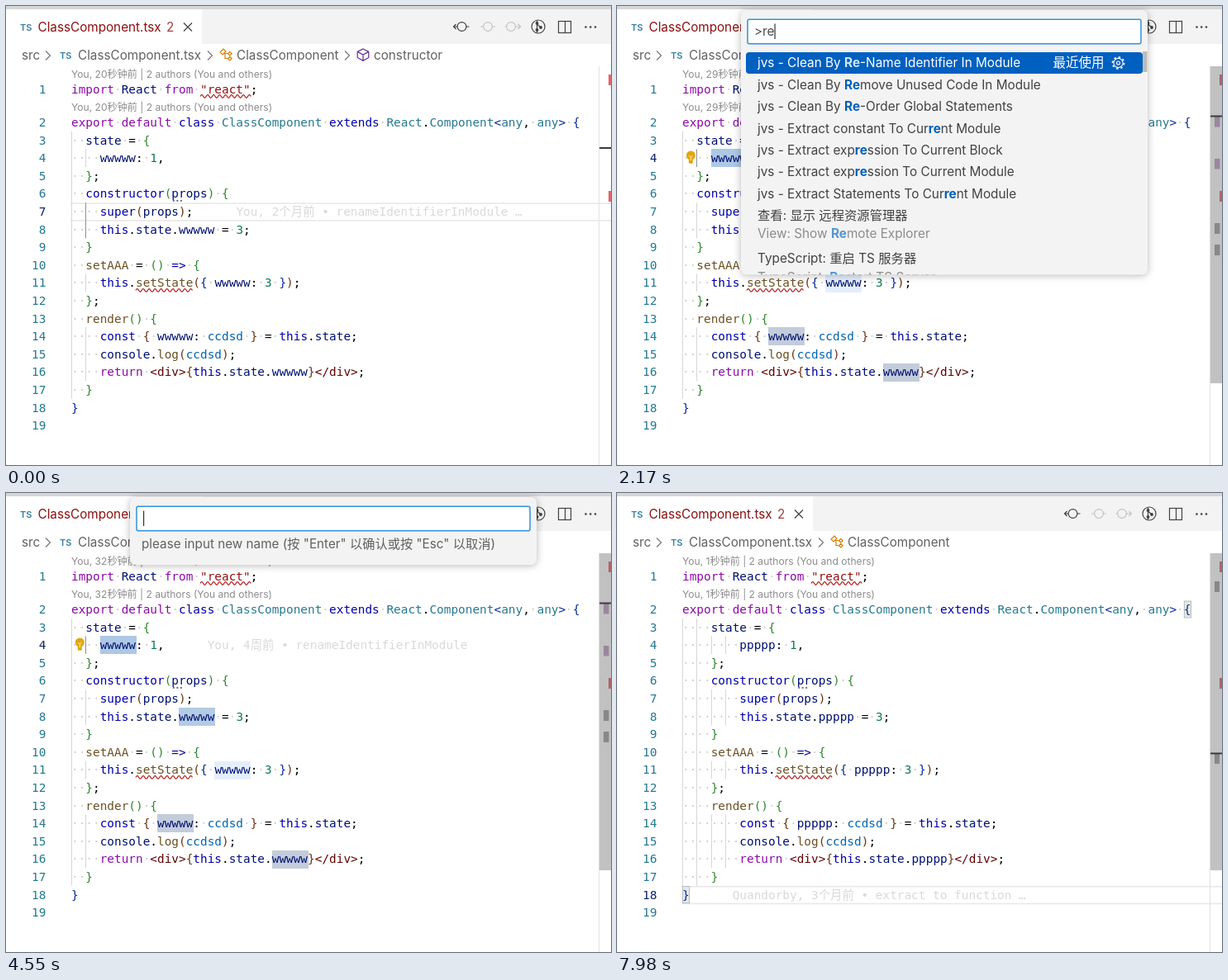
These frames come from a looping animation (732x556 px, 8 s). An HTML page:

```html
<!DOCTYPE html>
<html lang="zh-CN">
<head>
<meta charset="utf-8">
<title>Rename identifier</title>
<style>
  html, body { margin: 0; width: 100%; height: 100%; overflow: hidden; background: #fff; }
  svg { display: block; }
  text { white-space: pre; }
  .ui { font: 15.25px Inter, "Noto Sans CJK SC", sans-serif; fill: #616161; }
  .mono { font: 14.4px "DejaVu Sans Mono", "Noto Sans CJK SC", monospace; }
  .lens { font-size: 12.1px; fill: #8c8c8c; }
  .ts { font-size: 11px; font-weight: 600; fill: #3a7f9f; }
  .err { fill: #8a0f0f; }
  .blame { fill: #d9d9d9; }
  .dots { fill: #cfcfcf; }
  .num { fill: #237893; text-anchor: end; }
  .now { fill: #0b216f; }
  .line { fill: none; stroke: #424242; stroke-width: 1.2; }
  .pale { stroke: #c3c3c3; }
  .item { font-size: 15.33px; fill: #424242; }
  .typed { fill: #4a4a4a; }
  .bold { font-weight: 700; fill: #0060b8; }
  .sub { fill: #8c8c8c; }
  .sub .bold { fill: #5596cf; }
  .on { fill: #fff; }
  .on .bold { fill: #cbe8ff; }
  .cjk { font-size: 15.5px; }
  .link { fill: #0060b8; }
  .key { font-size: 13px; fill: #555; }
  .panel { fill: #f3f3f3; filter: drop-shadow(0 1px 5px rgba(0,0,0,.28)); }
</style>
</head>
<body>
<svg id="stage" width="732" height="556" viewBox="0 0 732 556"></svg>
<script>
const LOOP = 8000, LEFT = 79, CW = 8.669, LH = 21.6;
const stage = document.getElementById('stage');
const pen = document.createElement('canvas').getContext('2d');

const COLORS = {
  k: '#8c0aa5', b: '#0000a8', v: '#001070', y: '#267a90', f: '#6b5022', s: '#8f1212',
  n: '#0a7a50', c: '#0064b0', g: '#600000', t: '#000', 1: '#0a2a9c', 2: '#2f882f', 3: '#6a3414'
};
// Each line: indent level, then tokens led by a colour key; @ is the renamed identifier.
const CODE = [
  '0kimport| |vReact| |kfrom| |s"react"|t;',
  '0kexport default| |bclass| |yClassComponent| |bextends| |yReact|t.|yComponent|1<|yany|t,| |yany|1>| |1{',
  '1vstate| |t=| |2{',
  '2v@|t:| |n1|t,',
  '12}|t;',
  '1bconstructor|2(|vprops|2)| |2{',
  '2bsuper|3(|vprops|3)|t;',
  '2bthis|t.|vstate|t.|v@| |t=| |n3|t;',
  '12}',
  '1fsetAAA| |t=| |2()| |b=>| |2{',
  '2bthis|t.|fsetState|3(|1{| |v@|t:| |n3| |1}|3)|t;',
  '12}|t;',
  '1frender|2()| |2{',
  '2bconst| |3{| |v@|t:| |cccdsd| |3}| |t=| |bthis|t.|vstate|t;',
  '2vconsole|t.|flog|3(|cccdsd|3)|t;',
  '2kreturn| |g<div>|3{|bthis|t.|vstate|t.|v@|3}|g</div>|t;',
  '12}',
  '01}',
  '0'
];
const LONG_LIST = [
  'jvs - Clean By [Re-Name] Identifier In Module',
  'jvs - Clean By [Re]move Unused Code In Module',
  'jvs - Clean By [Re]-Order Global Statements',
  'jvs - Extract constant To Cur[re]nt Module',
  'jvs - Extract exp[re]ssion To Current Block',
  'jvs - Extract exp[re]ssion To Current Module',
  'jvs - Extract Statements To Cur[re]nt Module'
];
const QUERY = [[1610, ''], [1960, 'r'], [2100, 're'], [2240, 'ren'], [2310, 'rena'], [2450, 'renam'], [2590, 'rename']];
const NAME = [[3500, ''], [5320, 'p'], [5460, 'pp'], [5740, 'ppp'], [5880, 'pppp'], [6160, 'ppppp']];

const esc = s => s.replace(/&/g, '&amp;').replace(/</g, '&lt;');
const at = (steps, t) => steps.filter(s => s[0] <= t).pop()[1];
const colX = c => LEFT + c * CW;
const midY = n => n === 1 ? 101.4 : 141 + (n - 2) * LH;
const text = (x, y, s, cls = 'ui', extra = '') => `<text x="${x}" y="${y}" class="${cls}" ${extra}>${s}</text>`;
const rect = (x, y, w, h, fill, extra = '') => `<rect x="${x}" y="${y}" width="${w}" height="${h}" fill="${fill}" ${extra}/>`;
const path = (d, extra = '') => `<path d="${d}" class="line" ${extra}/>`;
const icon = (x, y, d, style = '') => `<g transform="translate(${x} ${y})">${path(d, `style="${style}"`)}</g>`;
const cursor = (c, n) => rect(Math.round(colX(c)), Math.round(midY(n) - LH / 2), 2, 22, '#000');

function squiggle(x, y, w) {
  return path(`M${x} ${y}q1.8 -3.6 3.6 0` + 't3.6 0'.repeat(Math.round(w / 3.6) - 1), 'style="stroke:#b01818"');
}

const wrench = x => icon(x, 51, 'M10 2a4 4 0 0 1 3 .3L10.3 5l.8 1.8 1.8.8 2.6-2.6a4.2 4.2 0 0 1-5.8 4.9L4.2 15.3a1.9 1.9 0 0 1-2.7-2.7L7 7.2A4.2 4.2 0 0 1 10 2z');
const cube = x => icon(x, 51, 'M8 1L14.8 4.4V11.4L8 15.2 1.2 11.4V4.4ZM1.2 4.4L8 8 14.8 4.4M8 8V15.2', 'stroke:#652d90');
const chevron = x => path(`M${x - 3} 54.5l5.5 5.5-5.5 5.5`, 'style="stroke:#777"');

function header(t) {
  let s = rect(0, 0, 732, 4, '#d6d6d6') + rect(0, 4, 237, 42, '#fff') + rect(237, 4, 495, 42, '#f3f3f3');
  s += text(17, 29.5, 'TS', 'ui ts') + text(38.5, 31, 'ClassComponent.tsx', 'ui err') + text(194, 31, '2', 'ui err', 'opacity=".8"');
  s += path('M215 20.5l10 10m0-10l-10 10');
  s += path('M560.5 25H557M546 25H541.5m3-3l-3 3 3 3') + '<circle cx="551.5" cy="25" r="5.4" class="line"/>';
  s += '<g class="line pale"><circle cx="583" cy="25" r="5.4"/><circle cx="611" cy="25" r="5.4"/>'
    + '<path d="M574 25h3.5m11 0h3.5M603.5 25h2m11 0h6m-3-3l3 3-3 3"/></g>';
  s += '<g class="line"><circle cx="644" cy="25" r="8"/><path d="M642.5 17.5v15M642.5 22l4.5 4"/>'
    + '<rect x="668.5" y="18.5" width="15" height="14"/><path d="M676.5 18.5v14"/></g>';
  for (const [x, y] of [[642.5, 21], [647, 26], [642.5, 29], [701.5, 25.5], [707.2, 25.5], [713, 25.5]])
    s += `<circle cx="${x}" cy="${y}" r="${x < 700 ? 1.9 : 1.3}" fill="#424242"/>`;

  s += text(19, 65, 'src') + chevron(51) + text(65, 63.5, 'TS', 'ui ts') + text(87, 65, 'ClassComponent.tsx') + chevron(247);
  s += icon(258, 51, 'M5 1L8 4 4 8 1 5ZM6 6.5H11M7 6.5V12.5H10.5M12.8 4.4l2.4 2.3-2.4 2.3-2.3-2.3zM12.8 10.4l2.4 2.3-2.4 2.3-2.3-2.3z', 'stroke:#d67e00');
  s += text(279, 65, 'ClassComponent');
  if (t < 770) s += chevron(413) + cube(424) + text(445, 65, 'constructor');
  else if (t < 7420) s += chevron(413) + wrench(424) + text(445, 65, 'state') + chevron(491) + wrench(502.5) + text(523.5, 65, 'wwwww');
  return s;
}

function codeLine(raw, n, unit, name) {
  const y = midY(n) + 5;
  let col = raw[0] * unit, plain = ' '.repeat(col), spans = '';
  for (const token of raw.slice(1).split('|')) {
    const word = token === ' ' ? ' ' : token.slice(1).replace('@', name);
    if (word.trim()) spans += `<tspan x="${colX(col)}" fill="${COLORS[token[0]]}">${esc(word)}</tspan>`;
    col += word.length;
    plain += word;
  }
  const dots = plain.replace(/[^ ]/g, '\u00a0').replace(/ /g, '·');
  return text(LEFT, y, dots, 'mono dots') + text(LEFT, y, spans, 'mono');
}

function guides(unit, active) {
  let s = '';
  for (let n = 3; n <= 17; n++)
    for (let c = 0; c < CODE[n - 1][0] * unit; c += 2) {
      const hot = c === 2 && active.includes(n);
      s += rect(Math.round(colX(c)), midY(n) - LH / 2, 1, LH, hot ? '#8f8f8f' : '#d6d6d6');
    }
  return s;
}

function highlights(t) {
  const spots = [[4, 4], [8, 15], [11, 20], [14, 12], [16, 28]];
  const soft = ['#add6ff', '#d6ebff', '#d6ebff', '#d6ebff', '#d6ebff'];
  const strong = ['#adc8e4', '#b3cbe3', '#e4effc', '#c3ccda', '#c3ccda'];
  const fills = t < 1120 ? soft : strong;
  return spots.map(([n, c], i) => i && t < 840 ? ''
    : rect(Math.round(colX(c)), Math.round(midY(n) - LH / 2), 44, 22, fills[i])).join('');
}

function ruler(t, done, line) {
  let s = rect(717, 73, 1, 483, '#e2e2e2');
  if (done) s += rect(723, 107, 6, 13, '#a0a0a0') + rect(723, 315, 6, 13, '#a0a0a0');
  else if (t >= 1120) {
    for (const y of [134, 185]) s += rect(723, y, 6.5, 12.5, '#bd9cc4');
    for (const y of [263, 289]) s += rect(723, y, 6.5, 13, '#a0a0a0');
  }
  for (const y of [83, 224]) s += rect(729, y, 3, 13, '#e0666c');
  if (t >= 630) s += rect(718, 73, 14, 384, 'rgba(100,100,100,.4)');
  return s + rect(718, { 7: 171, 4: 132.5, 18: 314.5 }[line], 14, 2, '#3c3c3c');
}

function editor(t) {
  const done = t >= 7070, unit = done ? 4 : 2, name = done ? 'ppppp' : 'wwwww';
  const line = done ? 18 : t < 630 ? 7 : 4;
  const picked = t >= 770 && !done;
  let s = '';
  if (!picked) for (const d of [-10.7, 10.1]) s += rect(LEFT - 1, midY(line) + d, 654, 1.6, '#e8e8e8');
  if (picked) s += highlights(t);
  if (t >= 7280) for (const [n, c] of [[2, 70], [18, 0]])
    s += rect(colX(c) + .5, midY(n) - 10, CW - .5, 20, '#e3ebe6', 'stroke="#b9b9b9"');
  s += guides(unit, done ? [] : line === 7 ? [7, 8] : [4]);

  const age = at([[0, 20], [1120, 29], [4060, 32], [7700, 1]], t);
  for (const y of [87, 126.5]) s += text(LEFT, y, `You, ${age}秒钟前 | 2 authors (You and others)`, 'ui lens');
  CODE.forEach((raw, i) => {
    const n = i + 1;
    s += text(48.3, midY(n) + 5, n, 'mono num' + (n === line ? ' now' : '')) + codeLine(raw, n, unit, name);
  });
  s += squiggle(colX(18), 109.5, CW * 7) + squiggle(colX(unit * 2 + 5), midY(11) + 9, CW * 8);
  for (const d of [2.5, 7, 11.5]) s += rect(colX(unit + 12) + d - 1, midY(6) + 7.5, 2, 2, '#6c6c8c');

  if (t < 630) s += text(colX(23), midY(7) + 5, 'You, 2个月前 • renameIdentifierInModule …', 'mono blame');
  if (t >= 840 && !done) s += text(colX(19), midY(4) + 5, 'You, 4周前 • renameIdentifierInModule', 'mono blame');
  if (t >= 7560) s += text(colX(7), midY(18) + 5, 'Quandorby, 3个月前 • extract to function …', 'mono blame');
  if (t >= 630 && t < 1400) s += cursor(9, 4);
  if (t >= 7210 && t < 7700) s += cursor(1, 18);
  if (t >= 1120 && !done)
    s += '<circle cx="89.3" cy="181" r="5.5" fill="#e3a60c"/>' + rect(86.8, 185, 5, 5.8, '#e3a60c', 'rx="1.5"')
      + path('M87 181l2.3 2 2.3-2M89.3 183v4', 'style="stroke:#fff3c4;stroke-width:1"');
  return s + ruler(t, done, line);
}

// Bolds the bracketed letters, up to the number typed so far.
function matched(s, typed) {
  return s.replace(/\[(.*?)\]/g, (_, word) => {
    let i = 0;
    for (; i < word.length && typed > 0; i++) if (word[i] !== '-') typed--;
    return `<tspan class="bold">${word.slice(0, i)}</tspan>${word.slice(i)}`;
  });
}

function list(typed) {
  const row = (y, s, cls = '') => text(170, y + 5.3, matched(s, typed), 'ui item ' + cls);
  let s = rect(156, 56, 480, 26, '#0060c0', 'rx="4"') + row(69, LONG_LIST[0], 'on');
  s += text(527.5, 74.3, '最近使用', 'ui on cjk');
  s += '<g fill="none" stroke="#fff" stroke-width="1.1"><circle cx="606.5" cy="69" r="5.6"/><circle cx="606.5" cy="69" r="2"/>'
    + '<circle cx="606.5" cy="69" r="7" stroke-width="1.8" stroke-dasharray="2.4 3.1"/></g>';
  if (typed < 3) {
    LONG_LIST.slice(1).forEach((item, i) => s += row(69 + (i + 1) * 26.4, item));
    s += row(253.5, '查看: 显示 远程资源管理器') + row(276, 'View: Show [Re]mote Explorer', 'sub');
    s += row(306, 'TypeScript: 重启 TS 服务器') + row(329, 'TypeScript: [Re]start TS Server', 'sub');
    return s + rect(636, 55, 5.5, 25, '#bcbcbc');
  }
  s += row(96, '终端: 重命名...') + row(119, 'Terminal: [Rename]...', 'sub');
  s += text(556.5, 101.3, '其他命令', 'ui cjk link');
  s += row(147, '重命名符号') + row(170.5, '[Rename] Symbol', 'sub');
  s += rect(584.5, 138, 29, 20, '#e8e8e8', 'rx="3" stroke="#d2d2d2"') + text(591, 153, 'F2', 'ui key');
  return s + row(200.5, 'Dev Containers: Clone [Re]pository in [Name]d Container Vol...');
}

function palette(t) {
  if (t < 1610 || t >= 7000) return '';
  const picking = t < 3500;
  const value = picking ? '>' + at(QUERY, t) : at(NAME, t);
  const bottom = !picking ? 87 : value.length < 4 ? 325.5 : 220;
  let s = `<rect x="150" y="5" width="492" height="${bottom - 5}" rx="7" class="panel"/>`;
  s += rect(158, 16.3, 476, 29.4, '#fff', 'rx="2" stroke="#2f94dc" stroke-width="1.5"') + text(166, 36.3, esc(value), 'ui typed');
  const blink = picking ? t < 3150 : t < 4060 || (t >= 4550 && t < 5110) || (t >= 5320 && t < 6720);
  pen.font = '15.25px Inter, sans-serif';
  if (blink) s += rect(166 + pen.measureText(value).width, 21.5, 1.2, 18.5, '#333');
  if (picking) s += `<clipPath id="clip"><rect x="150" y="50" width="492" height="${bottom - 50}"/></clipPath><g clip-path="url(#clip)">${list(value.length - 1)}</g>`;
  else s += text(164, 67, 'please input new name (按 "Enter" 以确认或按 "Esc" 以取消)');
  return s;
}

let shown = '';
function frame() {
  const t = performance.now() % LOOP;
  const next = header(t) + editor(t) + palette(t);
  if (next !== shown) stage.innerHTML = shown = next;
  requestAnimationFrame(frame);
}
frame();
</script>
</body>
</html>
```
